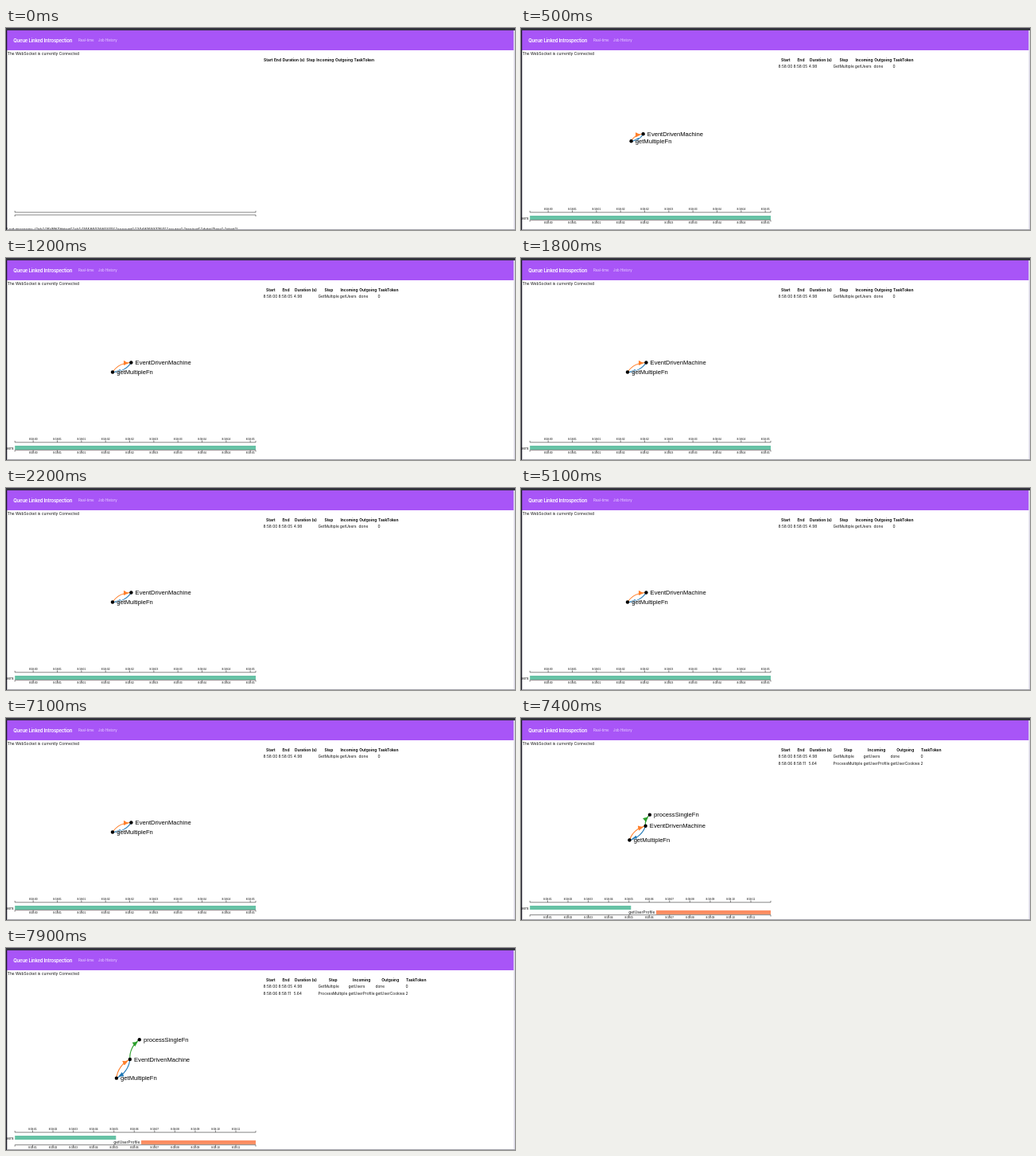
Recreate the animation shown at these times as an HTML page. Size 640 by 254 pixels, loop 8 s.

```html
<!DOCTYPE html>
<html lang="en">
<head>
<meta charset="utf-8">
<title>Event dashboard</title>
<style>
  html, body { margin: 0; height: 100%; overflow: hidden; background: #fff; }
  svg { display: block; width: 100vw; height: 100vh; }
  text { font: 4.88px Inter, sans-serif; fill: #111; white-space: pre; }
  .title { font-size: 6px; font-weight: 600; letter-spacing: -.22px; fill: #fff; }
  .nav { font-size: 4.35px; fill: #eddcff; }
  .head { font-weight: 700; }
  .mid { text-anchor: middle; }
  .end { text-anchor: end; }
  .tick { font: 3.2px "Liberation Sans", Arial, sans-serif; text-anchor: middle; fill: #000; }
  .node { font: 7.6px "Liberation Sans", Arial, sans-serif; fill: #000;
          paint-order: stroke; stroke: rgba(255, 255, 255, .8); stroke-width: 1.6px; }
  .axis { fill: none; stroke: #333; stroke-width: .6; }
  .link { fill: none; stroke-width: 1.1; }
</style>
</head>
<body>
<svg viewBox="0 0 640 254" preserveAspectRatio="none">
  <defs id="defs"></defs>
  <rect width="640" height="254" fill="#fff"/>
  <g id="page"></g>
  <g id="graph"></g>
  <rect x="1" y="3" width="637.5" height="25" fill="#a855f7"/>
  <text class="title" x="9.2" y="18.1">Queue Linked Introspection</text>
  <text class="nav" x="91" y="17.4">Real-time</text>
  <text class="nav" x="116" y="17.4">Job History</text>
  <text x="1.8" y="33.7">The WebSocket is currently Connected</text>
  <rect width="640" height="3" fill="#34333f"/>
  <rect y="3" width="1.3" height="251" fill="#1b1a26"/>
  <rect x="638.5" y="3" width="1.5" height="251" fill="#d9d7e6"/>
  <rect x="1" y="253" width="639" height="1" fill="#a3a3aa"/>
</svg>
<script>
const LOOP = 8000, FIRST = 400, SECOND = 7300, SETTLE = 150;
const LEFT = 11.2, RIGHT = 314, TOP = 231.8;
const $ = id => document.getElementById(id);
const tag = (name, attrs, body = '') =>
  `<${name} ${Object.entries(attrs).map(([k, v]) => `${k}="${v}"`).join(' ')}>${body}</${name}>`;
const label = (x, y, body, cls = '') => tag('text', { x, y, class: cls }, body);

const colors = { blue: '#1f77b4', orange: '#ff7f2a', green: '#2ca02c' };
const heads = ['Start', 'End', 'Duration (s)', 'Step', 'Incoming', 'Outgoing', 'TaskToken'];
const jobs = [
  ['8:58:00', '8:58:05', '4.98', 'GetMultiple', 'getUsers', 'done', '0'],
  ['8:58:06', '8:58:11', '5.64', 'ProcessMultiple', 'getUserProfile', 'getUserCookies', '2']
];
const message = 'Last message: {"pk":"EVENT#start","sk":"1658507480370","account":"204816937750",' +
  '"source":"project","detailType":"start"}';

// Each view: column edges, time axis and bars for the number of jobs received.
const views = [
  { cols: [323.3, 336.3, 346.6, 376.8, 389.6, 413, 437, 463.6], base: 235, ticks: 0, bars: [] },
  { cols: [323.3, 342.3, 361.6, 392.2, 419.6, 443.4, 467.2, 494.4], base: 241.6,
    ticks: 10, from: 34.2, gap: 30.33, second: i => (i + 1) >> 1,
    bars: [[LEFT, RIGHT, '#66c2a5', 'getUsers']] },
  { cols: [323.3, 342.3, 361.6, 392.2, 430.2, 464.2, 502.2, 529.4], base: 247.6,
    ticks: 11, from: 33.5, gap: 25.55, second: i => i + 1,
    bars: [[LEFT, 138.3, '#66c2a5', 'getUsers'], [170, RIGHT, '#fc8d62', 'getUserProfile']] }
];

function table({ cols }, count) {
  const head = heads.map((h, i) => label((cols[i] + cols[i + 1]) / 2, 41.8, h, 'head mid'));
  const rows = jobs.slice(0, count).map((job, r) =>
    job.map((v, i) => label(cols[i] + .2, 50.1 + r * 8.5, v)).join(''));
  return head.concat(rows).join('');
}

function axis(view, y, dir) {
  let d = `M${LEFT} ${y + 2 * dir}V${y}H${RIGHT}V${y + 2 * dir}`, out = '';
  for (let i = 0; i < view.ticks; i++) {
    const x = view.from + i * view.gap;
    d += `M${x} ${y}v${2.4 * dir}`;
    out += label(x, dir < 0 ? y - 2.4 : y + 4.6, '8:58:' + String(view.second(i)).padStart(2, '0'), 'tick');
  }
  return tag('path', { class: 'axis', d }) + out;
}

function page(count) {
  const view = views[count];
  const bars = view.bars.map(([x, end, fill, name], i) => {
    const y = 236 + i * 5.9;
    return tag('rect', { x, y, width: end - x, height: 5, fill }) + label(x - 1.6, y + 4.5, name, 'end');
  });
  return table(view, count) + axis(view, TOP, -1) + bars.join('') + axis(view, view.base, 1) +
    (count ? '' : label(1, 255.2, message));
}

// Nodes: label, then positions at birth, after the first job and after the second.
const nodes = [
  { name: 'getMultipleFn', at: [[143, 141], [134, 143.5], [139, 164]] },
  { name: 'EventDrivenMachine', at: [[150, 135], [157.4, 131.5], [155.8, 140.2]] },
  { name: 'processSingleFn', at: [, [156, 128], [168, 115]] }
];
const links = [[1, 0, 'blue'], [0, 1, 'orange'], [1, 2, 'green']];

function graph(count, age) {
  if (!count) return '';
  const k = 1 - Math.exp(-age / SETTLE);
  const live = nodes.slice(0, count + 1).map(({ name, at }) => {
    const [a, b] = [at[count - 1], at[count]];
    return { name, x: a[0] + (b[0] - a[0]) * k, y: a[1] + (b[1] - a[1]) * k };
  });
  const arcs = links.slice(0, count + 1).map(([s, e, hue]) => {
    const a = live[s], b = live[e], r = Math.hypot(b.x - a.x, b.y - a.y);
    return tag('path', { class: 'link', stroke: colors[hue], 'marker-end': `url(#${hue})`,
      d: `M${a.x} ${a.y}A${r} ${r} 0 0 1 ${b.x} ${b.y}` });
  });
  const dots = live.map(n => tag('circle', { cx: n.x, cy: n.y, r: 2.2 }));
  const names = live.map(n => label(n.x + 5.2, n.y + 2.5, n.name, 'node'));
  return [...arcs, ...dots, ...names].join('');
}

$('defs').innerHTML = Object.entries(colors).map(([id, fill]) =>
  tag('marker', { id, viewBox: '0 -5 10 10', refX: 15, refY: -1.5, markerWidth: 6.4, markerHeight: 6.4,
    markerUnits: 'userSpaceOnUse', orient: 'auto' }, tag('path', { d: 'M0-5L10 0L0 5Z', fill }))).join('');

let shown = -1;
function draw(now) {
  const t = now % LOOP;
  const count = t < FIRST ? 0 : t < SECOND ? 1 : 2;
  if (count !== shown) $('page').innerHTML = page(shown = count);
  $('graph').innerHTML = graph(count, t - (count === 2 ? SECOND : FIRST));
}

const start = performance.now();
function loop() {
  draw(performance.now() - start);
  requestAnimationFrame(loop);
}
loop();
</script>
</body>
</html>
```
